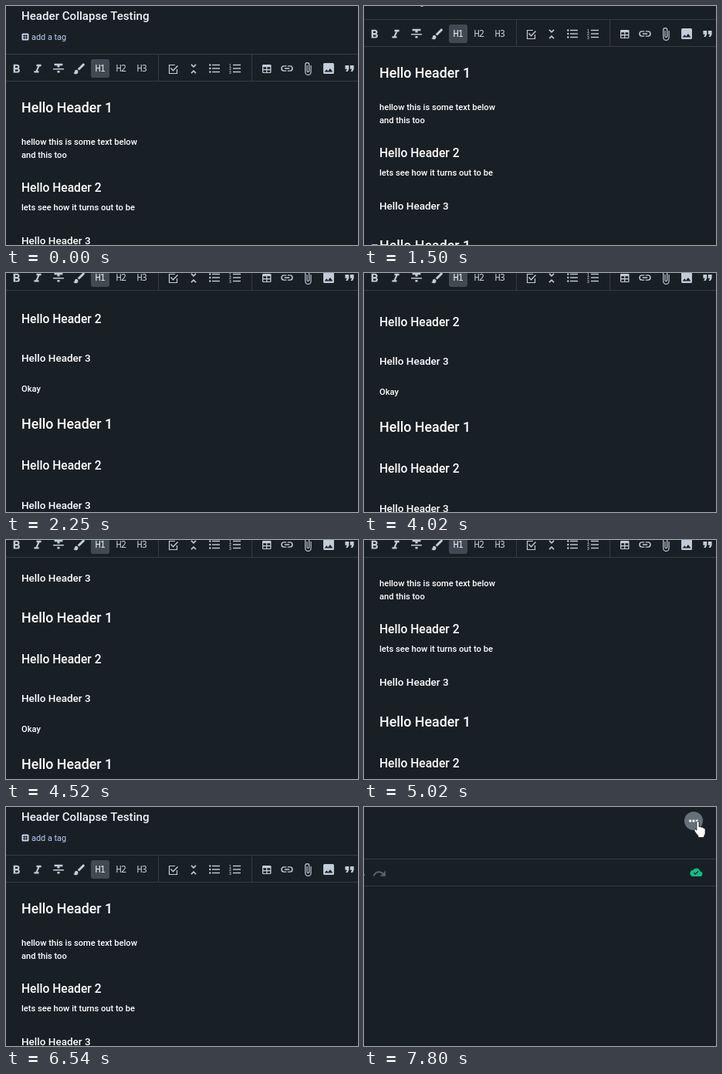
An HTML page with a canvas that plays this animation: 456 px wide and 310 px high, repeating every 8000 ms.

```html
<!DOCTYPE html>
<html lang="en">
<head>
<meta charset="utf-8">
<title>Header Collapse Testing</title>
<style>
html, body { margin: 0; width: 100%; height: 100%; overflow: hidden; background: #192025; }
canvas { display: block; width: 456px; height: 310px; }
</style>
</head>
<body>
<canvas id="stage"></canvas>
<script>
const W = 456, H = 310, LOOP = 8000, STICK = 75;
const BG = '#192025', LINE = '#343c43', ICON = '#c2ccd9', TEXT = '#fff';
const SANS = 'Roboto, sans-serif';

const canvas = document.getElementById('stage');
const dpr = window.devicePixelRatio || 1;
canvas.width = W * dpr;
canvas.height = H * dpr;
const ctx = canvas.getContext('2d', { alpha: false });

// Scroll position steps: [time, offset]
const SCROLL = [
  [0, 0], [1500, 45], [1750, 150], [2000, 280], [2250, 350], [4020, 346],
  [4270, 312], [4520, 255], [4770, 190], [5020, 120], [5270, 25], [5540, 0]
];

const STYLES = {
  h1: `500 17.8px ${SANS}`,
  h2: `500 15.6px ${SANS}`,
  h3: `500 13.5px ${SANS}`,
  p: `500 11.15px ${SANS}`
};

// Note body: [style, baseline, text]
const NOTE = [
  ['h1', 138, 'Hello Header 1'],
  ['p', 180, 'hellow this is some text below'],
  ['p', 197, 'and this too'],
  ['h2', 241, 'Hello Header 2'],
  ['p', 265, 'lets see how it turns out to be'],
  ['h3', 309, 'Hello Header 3'],
  ['h1', 362, 'Hello Header 1'],
  ['h2', 415, 'Hello Header 2'],
  ['h3', 465, 'Hello Header 3'],
  ['p', 504, 'Okay'],
  ['h1', 552, 'Hello Header 1'],
  ['h2', 605, 'Hello Header 2'],
  ['h3', 656, 'Hello Header 3']
];

// Icon outlines on a 24 unit grid
const SHAPES = {
  bold: 'M15.6 10.8c1-.7 1.65-1.8 1.65-2.8 0-2.26-1.75-4-4-4H7v14h7c2.1 0 3.75-1.7 3.75-3.8 0-1.5-.86-2.8-2.15-3.4zM10 6.5h3a1.5 1.5 0 0 1 0 3h-3zM13.5 15.5H10v-3h3.5a1.5 1.5 0 0 1 0 3z',
  italic: 'M10 4v3h2.2l-3.4 8H6v3h8v-3h-2.2l3.4-8H18V4z',
  strike: 'M10 19h4v-3h-4zM5 4v3h5v3h4V7h5V4zM3 14h18v-2H3z',
  brush: 'M7 14c-1.66 0-3 1.34-3 3 0 1.3-1.16 2-2 2 .9 1.2 2.5 2 4 2a4 4 0 0 0 4-4c0-1.66-1.34-3-3-3zM20.7 4.6l-1.3-1.3a1 1 0 0 0-1.4 0L9 12.25 11.75 15 20.7 6a1 1 0 0 0 0-1.4z',
  fold: 'M7.4 18.6L8.8 20 12 16.8 15.2 20l1.4-1.4L12 14zM16.6 5.4L15.2 4 12 7.2 8.8 4 7.4 5.4 12 10z',
  link: 'M3.9 12A3.1 3.1 0 0 1 7 8.9h4V7H7a5 5 0 0 0 0 10h4v-1.9H7A3.1 3.1 0 0 1 3.9 12zM8 13h8v-2H8zM17 7h-4v1.9h4a3.1 3.1 0 0 1 0 6.2h-4V17h4a5 5 0 0 0 0-10z',
  clip: 'M16.5 6v11.5a4 4 0 0 1-8 0V5a2.5 2.5 0 0 1 5 0v10.5a1 1 0 0 1-2 0V6H10v9.5a2.5 2.5 0 0 0 5 0V5a4 4 0 0 0-8 0v12.5a5.5 5.5 0 0 0 11 0V6z',
  image: 'M21 19V5a2 2 0 0 0-2-2H5a2 2 0 0 0-2 2v14a2 2 0 0 0 2 2h14a2 2 0 0 0 2-2zM8.5 13.5l2.5 3 3.5-4.5 4.5 6H5z',
  quote: 'M6 17h3l2-4V7H5v6h3zM14 17h3l2-4V7h-6v6h3z',
  redo: 'M18.4 10.6A10.5 10.5 0 0 0 1.5 15.2l2.4.8a8 8 0 0 1 12.7-3.6L13 16h9V7z',
  cloud: 'M19.35 10A7.5 7.5 0 0 0 5.35 8 6 6 0 0 0 6 20h13a5 5 0 0 0 .35-10zM10 17l-3.5-3.5 1.4-1.4 2.1 2.1L15.2 9l1.4 1.4z'
};
const HAND = 'M5.5.5q1.5 0 1.5 1.7v5.5q2.2-1 2.9.6 2.2-.6 2.8 1 2.4-.2 2.4 2.2v4q0 2-1.6 4v2H5.9v-2Q3.5 16.7 1 12.9q-.8-2.2 1-2.3 1 0 1.9 1.6V2.2Q3.9.5 5.5.5z';

const paths = {};
for (const name in SHAPES) paths[name] = new Path2D(SHAPES[name]);
const handPath = new Path2D(HAND);

function rect(x, y, w, h, color) {
  ctx.fillStyle = color;
  ctx.fillRect(x, y, w, h);
}

function round(x, y, w, h, r, color) {
  ctx.fillStyle = color;
  ctx.beginPath();
  ctx.roundRect(x, y, w, h, r);
  ctx.fill();
}

function dot(x, y, r, color) {
  ctx.fillStyle = color;
  ctx.beginPath();
  ctx.arc(x, y, r, 0, Math.PI * 2);
  ctx.fill();
}

function label(text, x, y, font, color = TEXT, spacing = 0) {
  ctx.font = font;
  ctx.letterSpacing = `${spacing}px`;
  ctx.fillStyle = color;
  ctx.fillText(text, x, y);
}

function icon(name, x, y, scale = 0.77, color = ICON) {
  ctx.save();
  ctx.translate(x, y);
  ctx.scale(scale, scale);
  ctx.translate(-12, -12);
  ctx.fillStyle = color;
  ctx.fill(paths[name], 'evenodd');
  ctx.restore();
}

function polyline(points, width) {
  ctx.strokeStyle = ICON;
  ctx.lineWidth = width;
  ctx.beginPath();
  points.forEach(([x, y]) => ctx.lineTo(x, y));
  ctx.stroke();
}

function checkBox() {
  polyline([[219, 76.5], [211.5, 76.5], [211.5, 87.5], [221.5, 87.5], [221.5, 82]], 1.2);
  polyline([[213.5, 80.5], [216.5, 83.7], [222.5, 77.5]], 1.4);
}

function lists() {
  for (let i = 0; i < 3; i++) {
    const y = 76.5 + i * 4.5;
    dot(264.3, y, 1.2, ICON);
    rect(267, y - 0.7, 10, 1.4, ICON);
    label(i + 1, 289, y + 2, `500 5px ${SANS}`, ICON);
    rect(294, y - 0.7, 10, 1.4, ICON);
  }
}

function table() {
  round(332, 76, 11.5, 11, 1.2, ICON);
  for (const x of [333.3, 338.4])
    for (const y of [79.2, 83.3]) rect(x, y, 3.8, 2.7, BG);
}

function toolbar(shift) {
  ctx.save();
  ctx.translate(0, -shift);
  rect(0, 62, W, 36, BG);
  rect(0, 62, W, 1, LINE);
  rect(0, 97, W, 1, LINE);
  rect(197, 63, 1, 34, LINE);
  rect(318, 63, 1, 34, LINE);

  icon('bold', 13.5, 82);
  icon('italic', 41, 82);
  icon('strike', 68, 81);
  icon('brush', 95, 81.3);
  round(110, 69, 24, 24, 3, '#414a52');
  ['H1', 'H2', 'H3'].forEach((text, i) => {
    label(text, 115.5 + i * 27, 85, '400 12px "Noto Sans Mono", monospace', i ? ICON : '#eef2f6', -0.9);
  });
  checkBox();
  icon('fold', 243, 81.5);
  lists();
  table();
  icon('link', 364, 81);
  icon('clip', 391, 81.5);
  icon('image', 418, 81);
  icon('quote', 445, 81, 0.8);
  ctx.restore();
}

function tagIcon() {
  round(20.5, 35.5, 9, 9, 1.5, '#c5d3e6');
  for (const d of [2.7, 5.3]) {
    rect(20.5 + d, 37, 1, 6, BG);
    rect(22, 35.5 + d, 6, 1, BG);
  }
}

function marker(y) {
  ctx.fillStyle = '#b9c1c9';
  ctx.beginPath();
  ctx.moveTo(9.5, y);
  ctx.lineTo(18, y);
  ctx.lineTo(13.75, y + 4.5);
  ctx.fill();
}

function note(t) {
  const scroll = SCROLL.filter(step => step[0] <= t).pop()[1];
  ctx.save();
  ctx.translate(0, -scroll);
  label('Header Collapse Testing', 20, 18, `500 15.1px ${SANS}`, '#f0f3f6');
  tagIcon();
  label('add a tag', 33, 44, `400 10.9px ${SANS}`, '#b4d0f5');
  for (const [style, y, text] of NOTE) label(text, 20, y, STYLES[style]);
  if (t >= 1500 && t < 1750) marker(354);
  if (t >= 6290 && t < 6540) marker(302);
  ctx.restore();
  toolbar(Math.min(scroll, STICK));
}

function textCursor(x, y) {
  rect(x + 3, y + 1, 1, 14, '#fff');
  for (const edge of [y, y + 15]) {
    rect(x, edge, 3, 1, '#fff');
    rect(x + 4, edge, 3, 1, '#fff');
  }
}

function hand(x, y) {
  ctx.save();
  ctx.translate(x, y);
  ctx.fillStyle = '#fff';
  ctx.fill(handPath);
  ctx.strokeStyle = '#15191d';
  ctx.lineWidth = 0.8;
  ctx.stroke(handPath);
  ctx.restore();
}

function menu(t) {
  const hover = t >= 7800;
  rect(0, 67, W, 1, LINE);
  rect(0, 102, W, 1, LINE);
  rect(0, 87, 1, 2, '#59626a');
  icon('redo', 20, 86.5, 0.79, '#59626a');
  icon('cloud', 430.5, 84.7, 0.65, '#10bf86');
  if (hover) dot(427, 18, 12, '#65707b');
  for (let i = 0; i < 3; i++) dot(422.6 + i * 4.4, 18, 1.7, hover ? '#f1f4f7' : ICON);
  if (hover) hand(427, 18);
  else if (t >= 7550) textCursor(427, 7);
  else if (t >= 7290) textCursor(367, 119);
}

function draw(t) {
  ctx.setTransform(dpr, 0, 0, dpr, 0, 0);
  rect(0, 0, W, H, BG);
  if (t < 7040) note(t);
  else menu(t);
}

const start = performance.now();
function tick() {
  draw((performance.now() - start) % LOOP);
  requestAnimationFrame(tick);
}
tick();
</script>
</body>
</html>
```
